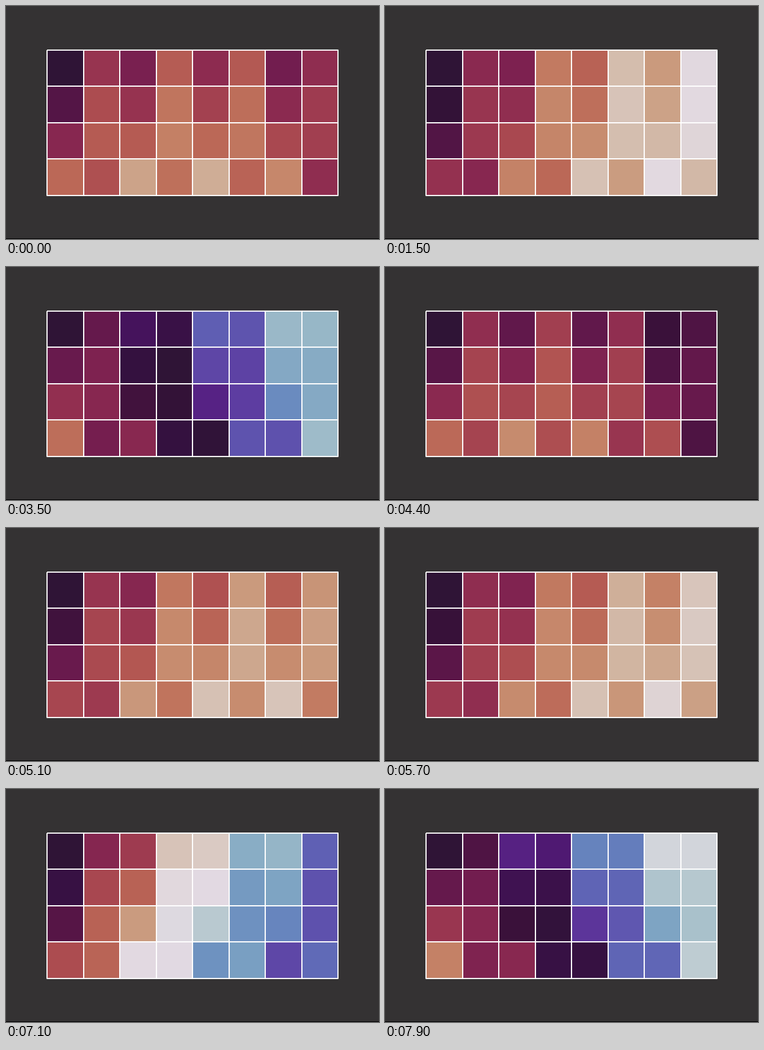
A matplotlib script that plays this animation: 600x375 px, repeating every 8000 ms.

```python
import numpy as np
import matplotlib.pyplot as plt
from matplotlib.animation import FuncAnimation
from matplotlib.patches import Rectangle

W, H, DPI = 600, 375, 100
STEP, FRAMES = 100, 80
PERIOD = 4600
ROWS, COLS = 4, 8

# Key poses of the phase sheet, in turns:
# time, corners (top left, top right, bottom left, bottom right), bow
POSES = np.array([
    (0, .57, .62, .73, .72, .12),
    (500, .55, .80, .67, .86, .10),
    (1500, .52, .94, .63, .96, .06),
    (1800, .53, .98, .60, .99, .05),
    (2300, .40, 1.55, .66, 1.62, .12),
    (3300, .59, -.01, .77, .12, .03),
    (3500, .61, .07, .74, .16, .04),
])

v, u = np.meshgrid(np.linspace(0, 1, ROWS), np.linspace(0, 1, COLS),
                   indexing="ij")
ripple = .05 * np.cos(np.pi * np.arange(COLS)) * (2 * v**3 - 1)


def phases(ms):
    """Tilt and bend the sheet, then add the fixed column ripple."""
    tl, tr, bl, br, bow = (np.interp(ms, POSES[:, 0], p, period=PERIOD)
                           for p in POSES[:, 1:].T)
    left = tl + (bl - tl) * v
    right = tr + (br - tr) * v
    sheet = left + (right - left) * u + bow * 4 * u * (1 - u) + ripple
    sheet[0, 0] = .5  # the constant term never turns
    return sheet % 1


fig = plt.figure(figsize=(W / DPI, H / DPI), dpi=DPI, facecolor="#343233")
ax = fig.add_axes([0, 0, 1, 1])
ax.set(xlim=(0, W), ylim=(H, 0))
ax.axis("off")

mesh = ax.pcolormesh(np.linspace(66, 534, COLS + 1),
                     np.linspace(70.5, 304.5, ROWS + 1),
                     phases(0), cmap="twilight", vmin=0, vmax=1,
                     edgecolors="white", linewidth=1.35, antialiased=True)
ax.add_patch(Rectangle((0, H - 1), W, 1, color="black", lw=0))


def update(i):
    mesh.set_array(phases(i * STEP))
    return [mesh]


anim = FuncAnimation(fig, update, frames=FRAMES, interval=STEP,
                     repeat=True, repeat_delay=0)
plt.show()
```
